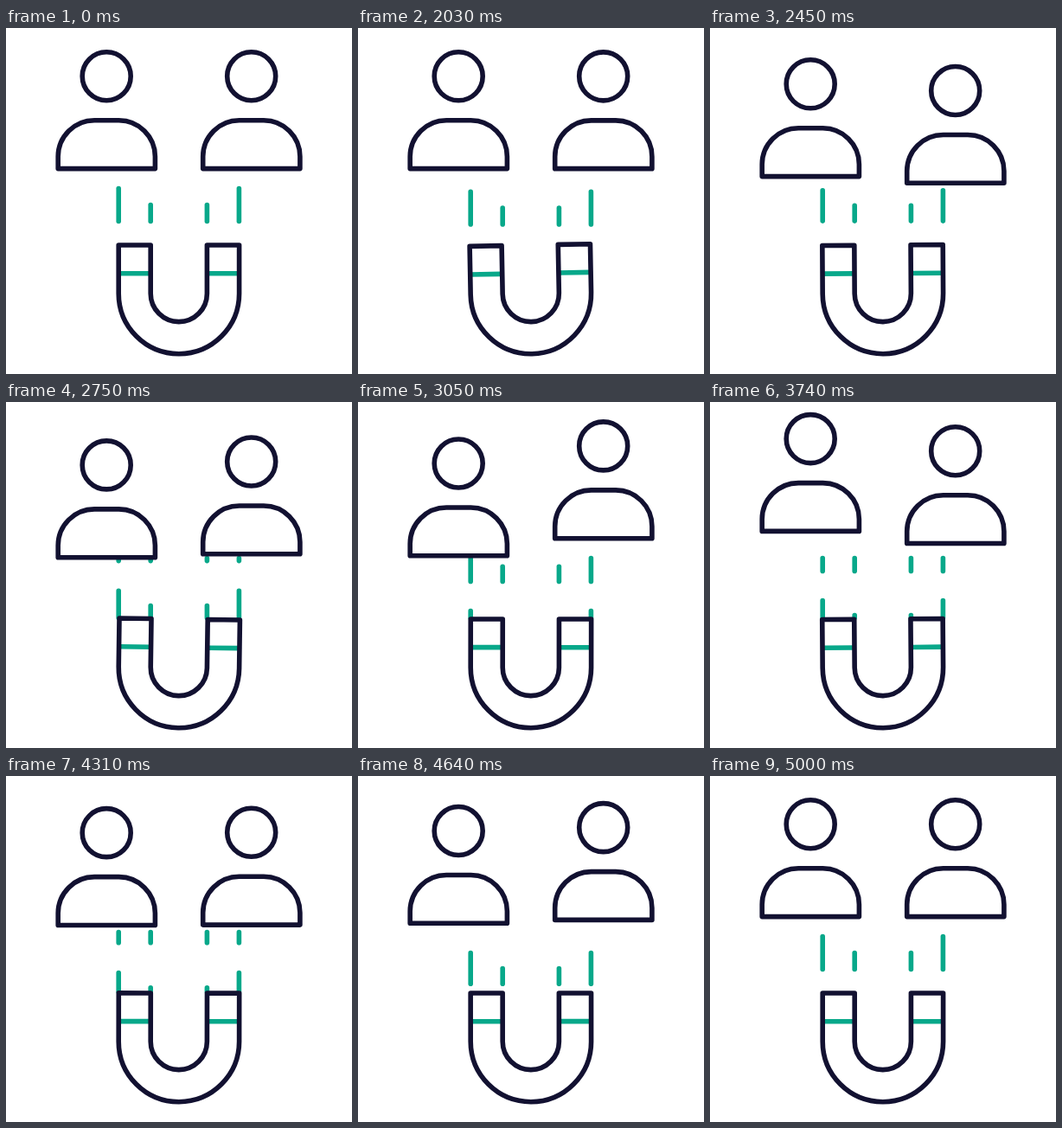
Write an HTML page that moves like this. It is 400 px wide and 400 px high and loops after 5030 ms.

```html
<!DOCTYPE html>
<html lang="en">
<head>
<meta charset="utf-8">
<title>Magnet attracting people</title>
<style>
  html, body { margin: 0; width: 100%; height: 100%; overflow: hidden; background: #fff; }
  svg { display: block; width: 100vw; height: 100vh; }
  .ink, .accent { fill: none; stroke-width: 5.6; stroke-linecap: round; stroke-linejoin: round; }
  .ink { stroke: #121131; }
  .accent { stroke: #08a88a; }
</style>
</head>
<body>
<svg viewBox="0 0 400 400">
  <defs>
    <g id="person">
      <circle cx="116.2" cy="55.8" r="28"/>
      <path d="M60.2 162.6V148.6A42 42 0 0 1 102.2 106.8H130.4A42 42 0 0 1 172.4 148.6V162.6Z"/>
    </g>
  </defs>
  <g id="pull" class="accent"></g>
  <g id="magnet">
    <path class="accent" d="M131 283.7H166M234 283.7H269"/>
    <path class="ink" d="M130.2 251V307A69.7 69.7 0 0 0 269.6 307V251H232.4V307A32.6 32.6 0 0 1 167.2 307V251Z"/>
  </g>
  <g class="ink">
    <use id="left" href="#person"/>
    <use id="right" href="#person"/>
  </g>
</svg>
<script>
const LOOP = 5030, HOLD = 2030, STEP = 30;
const START = 2015, END = 5000;
const HALF_BOB = 760, BOB_HEIGHTS = [18.5, -14, 11.3];
const SHAKE_PERIOD = 131.8;
const TOP = 180.5, BOTTOM = 249.5, REST = 223.5, DASH = 19;

const $ = id => document.getElementById(id);
const smooth = u => u * u * (3 - 2 * u);

// Eased swing between evenly spaced turning points, settling at rest
function bob(t, firstPeak) {
  let from = START, height = 0;
  for (const [i, next] of [...BOB_HEIGHTS, 0].entries()) {
    const to = i < BOB_HEIGHTS.length ? firstPeak + i * HALF_BOB : END;
    if (t <= to) return height + (next - height) * smooth((t - from) / (to - from));
    from = to;
    height = next;
  }
  return 0;
}

// Five dash periods in all, slower around the middle
const travel = p => 5 * p + p * (1 - p) * (4.05 - 14.5 * p + 9.28 * p * p);

const dashes = [];
for (const side of [-1, 1]) {
  for (const [distance, length] of [[69.6, 2 * DASH], [32.6, DASH]]) {
    const el = document.createElementNS("http://www.w3.org/2000/svg", "path");
    el.setAttribute("d", `M${199.8 + side * distance} ${TOP}V${BOTTOM}`);
    $("pull").append(el);
    dashes.push({ el, length });
  }
}

function draw(time) {
  const t = Math.max(START, Math.min(END, time));
  const p = (t - START) / (END - START);

  $("left").setAttribute("transform", `translate(0 ${bob(t, 2900)})`);
  $("right").setAttribute("transform", `translate(167.5 ${bob(t, 2555)})`);

  const shake = p > 0 ? -1.1 * (1 - p) * Math.cos(2 * Math.PI * (t - HOLD) / SHAKE_PERIOD) : 0;
  $("magnet").setAttribute("transform", `rotate(${shake} 200 309)`);

  const scale = 1 - 0.105 * Math.sqrt(Math.abs(Math.sin(Math.PI * p)));
  const period = 4 * DASH * scale;
  const end = REST + (travel(p) % 1) * period;
  for (const { el, length } of dashes) {
    const dash = length * scale;
    el.setAttribute("stroke-dasharray", `${dash} ${period - dash}`);
    el.setAttribute("stroke-dashoffset", (TOP - end + dash) % period + period);
  }
}

const origin = performance.now();
function tick() {
  const t = (performance.now() - origin) % LOOP;
  draw(t < HOLD ? 0 : HOLD + Math.floor((t - HOLD) / STEP) * STEP);
  requestAnimationFrame(tick);
}
tick();
</script>
</body>
</html>
```
